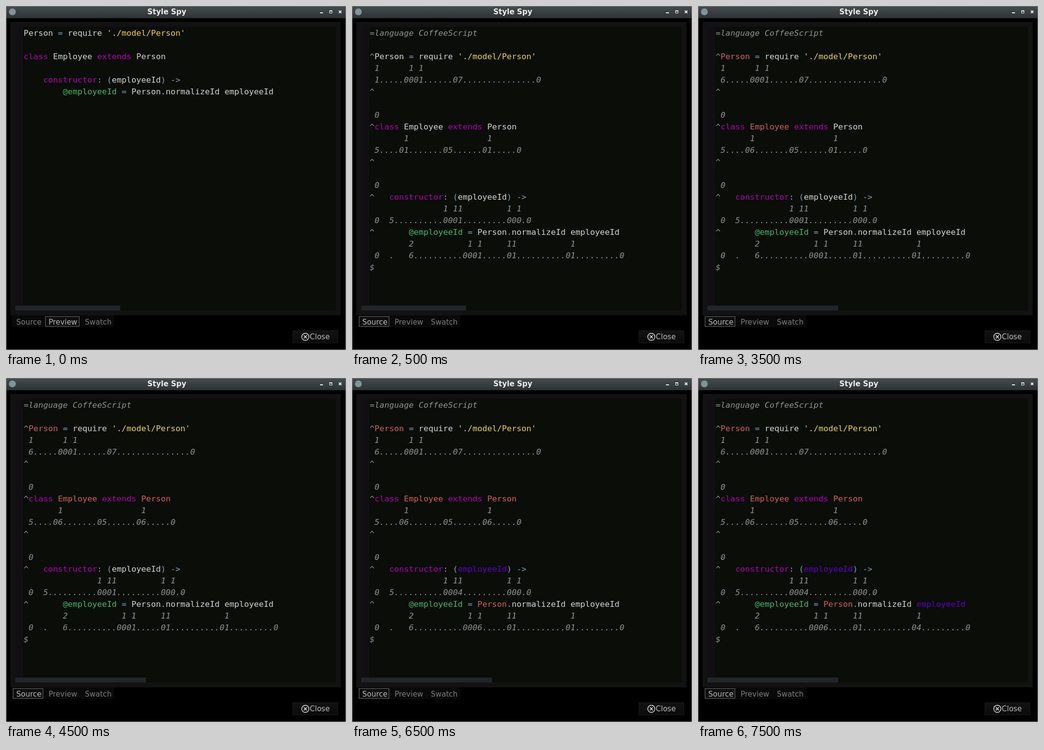
These frames come from a looping animation (694 by 705 pixels, 8000 ms). An HTML page with a canvas:

```html
<!DOCTYPE html>
<html lang="en">
<head>
<meta charset="utf-8">
<title>Style Spy</title>
<style>
  html, body { margin: 0; width: 100%; height: 100%; overflow: hidden; background: #000; }
  canvas { display: block; width: 694px; height: 705px; }
</style>
</head>
<body>
<canvas id="stage" width="694" height="705"></canvas>
<script>
const ctx = document.getElementById('stage').getContext('2d');

const LOOP = 8000;
const SANS = '"DejaVu Sans", sans-serif';
const MONO = '16.61px "DejaVu Sans Mono", monospace'; // 10px per column
const LEFT = 36, BASE = 61, COL = 10, ROW = 24;

const INK = {
  id: '#d4d4d0', op: '#7f9fbf', key: '#b000b4', str: '#ecd44c',
  attr: '#44b868', note: '#909090', type: '#d0605c', arg: '#6000c0'
};

// Moments at which each word gets its new style
const AT = { source: 500, person: 2500, employee: 3500, parent: 4500, call: 5500, param: 6500, use: 7500 };

function rect(x, y, w, h, fill) {
  ctx.fillStyle = fill;
  ctx.fillRect(x, y, w, h);
}

function shade(y0, y1, from, to) {
  const g = ctx.createLinearGradient(0, y0, 0, y1);
  g.addColorStop(0, from);
  g.addColorStop(1, to);
  return g;
}

function label(text, x, y, fill, weight = '') {
  ctx.font = `${weight} 15px ${SANS}`;
  ctx.fillStyle = fill;
  ctx.fillText(text, x, y);
}

function stroke(color, width, ...lines) {
  ctx.strokeStyle = color;
  ctx.lineWidth = width;
  ctx.beginPath();
  for (const [x0, y0, x1, y1] of lines) {
    ctx.moveTo(x0, y0);
    ctx.lineTo(x1, y1);
  }
  ctx.stroke();
}

function cross(x, y, r, color, width) {
  stroke(color, width, [x - r, y - r, x + r, y + r], [x + r, y - r, x - r, y + r]);
}

function type(text, col, row, ink) {
  ctx.font = ink === 'note' ? 'italic ' + MONO : MONO;
  ctx.fillStyle = INK[ink];
  ctx.fillText(text, LEFT + col * COL, BASE + row * ROW);
}

function line(col, row, tokens) {
  for (const [ink, text] of tokens) {
    type(text, col, row, ink);
    col += text.length;
  }
}

function codeLines(t) {
  const ink = (name, after) => t >= AT[name] ? after : 'id';
  return [
    [[ink('person', 'type'), 'Person'], ['op', ' = '], ['id', 'require '], ['str', "'./model/Person'"]],
    [['key', 'class '], [ink('employee', 'type'), 'Employee'], ['key', ' extends '], [ink('parent', 'type'), 'Person']],
    [['key', 'constructor'], ['op', ': ('], [ink('param', 'arg'), 'employeeId'], ['op', ') ->']],
    [['attr', '@employeeId'], ['op', ' = '], [ink('call', 'type'), 'Person'], ['op', '.'],
     ['id', 'normalizeId '], [ink('use', 'arg'), 'employeeId']]
  ];
}

function preview(t) {
  const cols = [0, 0, 4, 8], rows = [0, 2, 4, 5];
  codeLines(t).forEach((tokens, i) => line(cols[i], rows[i], tokens));
}

function source(t) {
  const digit = (name, after) => t >= AT[name] ? after : '1';
  const cols = [1, 1, 4, 8], rows = [2, 8, 14, 17];
  codeLines(t).forEach((tokens, i) => line(cols[i], rows[i], tokens));
  for (const row of [2, 5, 8, 11, 14, 17]) type('^', 0, row, 'note');

  const notes = {
    0: '=language CoffeeScript',
    3: ' 1      1 1',
    4: ` ${digit('person', '6')}.....0001......07...............0`,
    7: ' 0',
    9: '       1                1',
    10: ` 5....0${digit('employee', '6')}.......05......0${digit('parent', '6')}.....0`,
    13: ' 0',
    15: '               1 11         1 1',
    16: ` 0  5..........000${digit('param', '4')}.........000.0`,
    18: '        2           1 1     11           1',
    19: ` 0  .   6..........000${digit('call', '6')}.....01..........0${digit('use', '4')}.........0`,
    20: '$'
  };
  for (const row in notes) type(notes[row], 0, row, 'note');
}

function windowFrame() {
  rect(0, 0, 694, 705, '#7c8080');
  rect(1, 1, 692, 703, '#000');
  rect(1, 1, 692, 24, shade(1, 25, '#454c4e', '#2d3234'));
  ctx.fillStyle = '#80949a';
  ctx.beginPath();
  ctx.arc(13, 12, 7, 0, Math.PI * 2);
  ctx.fill();
  label('Style Spy', 288.5, 17, '#eeeeee', 'bold');

  rect(641, 13, 6, 2, '#f0f0f0');
  ctx.strokeStyle = '#f0f0f0';
  ctx.lineWidth = 1;
  ctx.strokeRect(660.5, 9.5, 5, 5);
  rect(660, 9, 6, 2, '#f0f0f0');
  cross(682, 12, 2.5, '#f0f0f0', 1.8);
}

function editor(t) {
  rect(9, 33, 674, 601, '#111211');
  rect(19, 43, 654, 581, '#0a0d08');
  rect(19, 43, 16, 571, '#120f14');
  rect(19, 614, t < AT.person ? 214 : 267, 10, '#212528');
  (t < AT.source ? preview : source)(t);
}

function tabs(t) {
  const active = t < AT.source ? 1 : 0;
  rect(12, 634, 209, 24, '#090909');
  [['Source', 21, 14, 62], ['Preview', 87, 80, 70], ['Swatch', 161, 154, 66]].forEach(([name, x, left, w], i) => {
    if (i === active) {
      rect(left, 636, w, 21, '#0e0e0e');
      ctx.strokeStyle = '#c8c8c8';
      ctx.lineWidth = 1;
      ctx.setLineDash([1, 1]);
      ctx.strokeRect(left + 0.5, 636.5, w - 1, 20);
      ctx.setLineDash([]);
    }
    label(name, x, 653, i === active ? '#b8b8b8' : '#7c7c7a');
  });
}

function closeButton() {
  rect(585, 665, 93, 26, '#1a1a1a');
  rect(586, 666, 91, 24, shade(666, 690, '#121212', '#0b0b0b'));
  ctx.strokeStyle = '#e4e4e4';
  ctx.lineWidth = 1.4;
  ctx.beginPath();
  ctx.arc(611, 678, 7.3, 0, Math.PI * 2);
  ctx.stroke();
  cross(611, 678, 3.2, '#e4e4e4', 1.6);
  label('Close', 620, 683, '#b8b8b8');
}

function draw() {
  const t = performance.now() % LOOP;
  windowFrame();
  editor(t);
  tabs(t);
  closeButton();
  requestAnimationFrame(draw);
}
draw();
</script>
</body>
</html>
```
